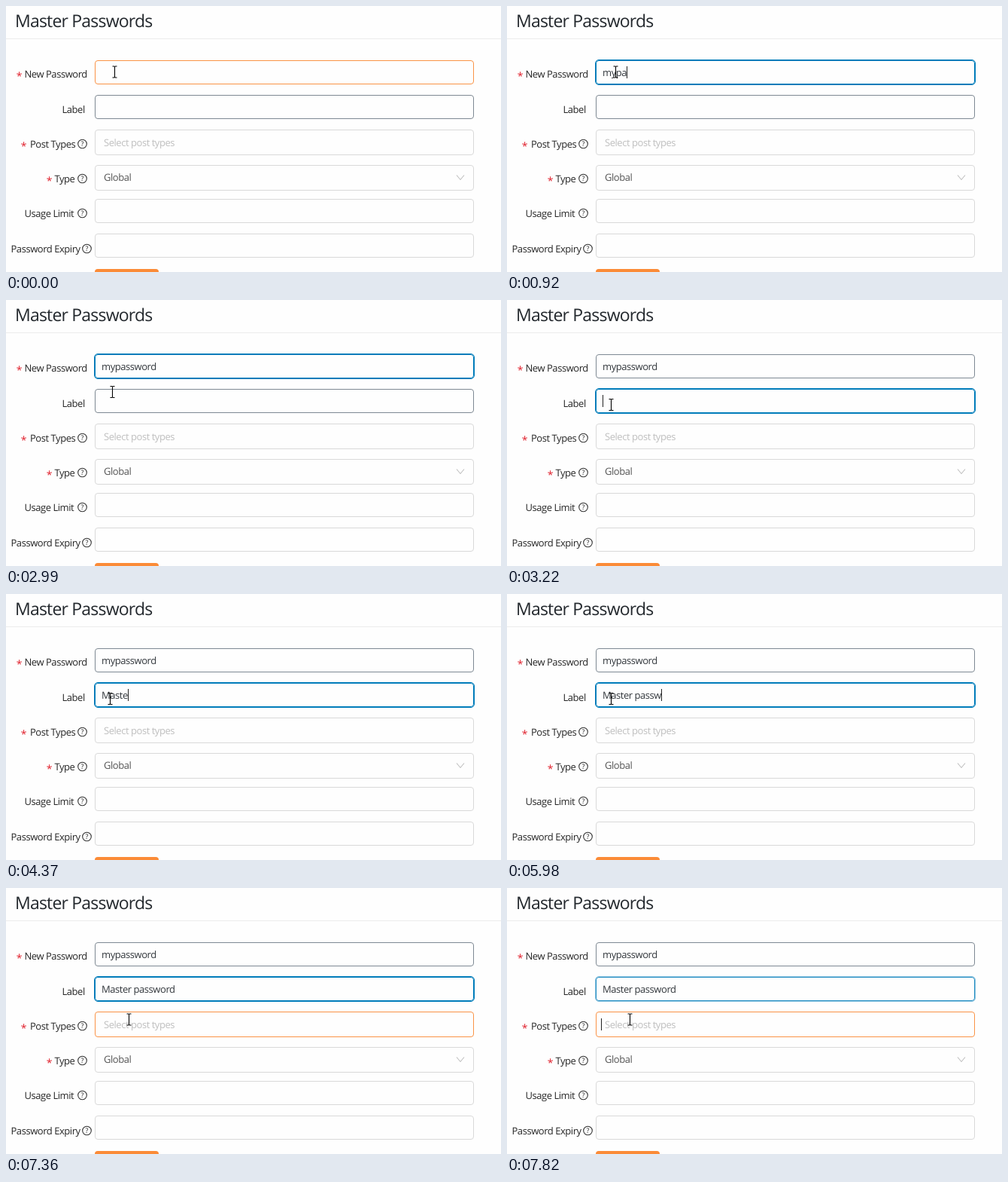
An HTML page for the animation above (8000 ms loop, 658x353 px).

```html
<!DOCTYPE html>
<html lang="en">
<head>
<meta charset="utf-8">
<title>Master Passwords</title>
<style>
html, body { margin: 0; width: 100%; height: 100%; overflow: hidden; background: #fefefe; }
svg { display: block; width: 658px; height: 353px; }
text {
  font: 13px "Open Sans", "Noto Sans", sans-serif;
  letter-spacing: -.035em;
  white-space: pre;
  text-rendering: geometricPrecision;
  fill: #262626;
}
.title { font-size: 23px; fill: #23282d; }
.typed { fill: #32373c; }
.value { fill: #555; }
.placeholder { fill: #bfbfbf; }
.star { font-size: 14px; fill: #e0202c; text-anchor: middle; letter-spacing: 0; }
.mark { font-size: 9px; text-anchor: middle; letter-spacing: 0; }
.help circle, .box, .chevron { fill: none; }
.help circle { stroke: #333; stroke-width: 1.1; }
.box { stroke: #d9d9d9; }
.chevron { stroke: #bfbfbf; stroke-width: 1.1; }
.glow { fill: none; stroke: #007cba; }
.caret { stroke: #222; }
</style>
</head>
<body>
<svg id="stage" viewBox="0 0 658 353">
  <text class="title" x="12" y="28">Master Passwords</text>
  <path d="M0 43.5H658" stroke="#ebebeb"/>
  <g id="form"></g>
  <path class="chevron" d="M599 224.5l5 6 5-6"/>
  <rect x="118" y="349" width="85" height="20" rx="4" fill="#fb8b37"/>
  <text class="placeholder" x="130" y="186">Select post types</text>
  <text class="value" x="130" y="232">Global</text>
  <text class="typed" id="password" x="127" y="93"></text>
  <text class="typed" id="label" x="127" y="139"></text>
  <path class="caret" id="caret"/>
  <path id="pointer" d="M-3 -7.5H-1L0 -7L1 -7.5H3M0 -7V7M-3 7.5H-1L0 7L1 7.5H3" fill="none" stroke="#000" stroke-width="1.1"/>
</svg>
<script>
const STEP = 230, LOOP = 8000, BLINK = 1060;
const GRAY = '#d9d9d9', SLATE = '#7e8993', BLUE = '#007cba', ORANGE = '#fa9346';
const $ = id => document.getElementById(id);

// name, label x, baseline, box top, box height, star x, help icon x
const fields = [
  ['New Password', 24.5, 95, 72, 32, 17.5],
  ['Label', 74.5, 142, 118, 32],
  ['Post Types', 32, 188, 164, 34, 23.5, 101.5],
  ['Type', 64.5, 234, 211, 34, 57.5, 101.5],
  ['Usage Limit', 24.5, 280, 256, 32, 0, 101.5],
  ['Password Expiry', 6.5, 327, 302, 32, 0, 107.5]
];

$('form').innerHTML = fields.map(([name, x, y, top, height, star, help]) => `
  <text x="${x}" y="${y}">${name}</text>
  ${star ? `<text class="star" x="${star}" y="${y + 3}">*</text>` : ''}
  ${help ? `<g class="help"><circle cx="${help}" cy="${y - 5}" r="5.8"/>
    <text class="mark" x="${help}" y="${y - 1.7}">?</text></g>` : ''}
  <rect class="glow" x="117.5" y="${top - .5}" width="505" height="${height + 1}" rx="4.5"/>
  <rect class="box" x="118.5" y="${top + .5}" width="503" height="${height - 1}" rx="3.5"/>`).join('');

const boxes = document.querySelectorAll('.box');
const glows = document.querySelectorAll('.glow');

// step, pointer x, pointer y
const pointerPath = [
  [0, 144.5, 87.5], [12, 143.5, 98.5], [13, 141.5, 122], [14, 138.5, 139],
  [30, 159.5, 168], [31, 163.5, 174.5]
];

function setBorder(index, color, glow = 0) {
  boxes[index].style.stroke = color;
  glows[index].style.opacity = glow;
}

function placeCaret(x, top, bottom, visible = true) {
  $('caret').setAttribute('d', `M${x} ${top}V${bottom}`);
  $('caret').style.opacity = visible ? 1 : 0;
}

function caretAfter(id, top, idleTime) {
  const x = 127 + Math.round($(id).getComputedTextLength()) + .5;
  placeCaret(x, top, top + 16, idleTime % BLINK < BLINK / 2);
}

function draw(time) {
  const step = Math.floor(time / STEP);
  const inPassword = step >= 1 && step < 14;
  const inLabel = step >= 14 && step < 34;

  $('password').textContent = 'mypassword'.slice(0, step < 2 ? 0 : step);
  $('label').textContent = 'Master password'.slice(0, step < 15 ? 0 : Math.max(2, step - 14));

  setBorder(0, inPassword ? BLUE : step < 1 ? ORANGE : SLATE, +inPassword);
  setBorder(1, step < 14 ? SLATE : step < 34 ? BLUE : '#238dc2', inLabel ? 1 : step < 14 ? 0 : .45);
  setBorder(2, step < 31 ? GRAY : ORANGE);
  for (const i of [3, 4, 5]) setBorder(i, GRAY);

  if (inPassword) caretAfter('password', 80, Math.max(0, step - 10) * STEP);
  else if (inLabel) caretAfter('label', 126, Math.max(0, step - 29) * STEP);
  else placeCaret(125.5, 173, 189, step >= 34);

  const [, x, y] = pointerPath.findLast(([start]) => start <= step);
  $('pointer').setAttribute('transform', `translate(${x} ${y})`);
}

const start = performance.now();
function tick() {
  draw((performance.now() - start) % LOOP);
  requestAnimationFrame(tick);
}
tick();
</script>
</body>
</html>
```
